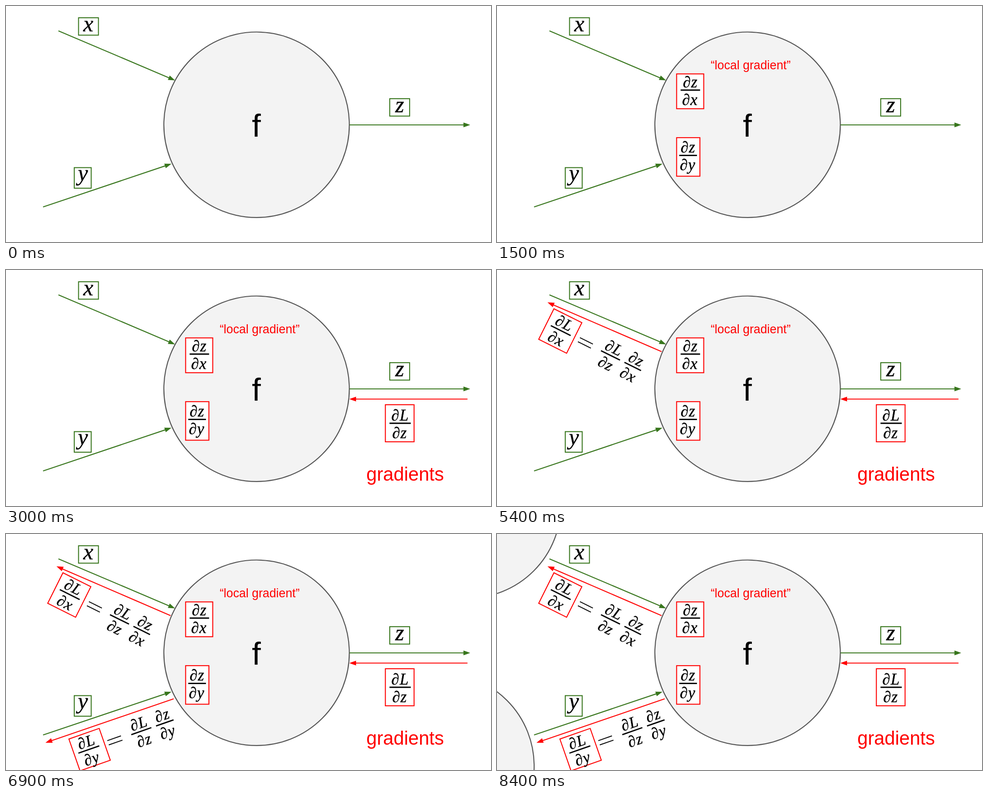
Animation of 1073x522 px, one loop 9000 ms. Source, as an HTML page:

```html
<!DOCTYPE html>
<html lang="en">
<head>
<meta charset="utf-8">
<title>Local gradients</title>
<style>
  html, body { margin: 0; width: 100%; height: 100%; overflow: hidden; background: #fff; }
  svg { display: block; width: 100%; height: 100%; }
  text { font-family: "Liberation Sans", Arial, sans-serif; }
  .math { font-family: "Liberation Serif", "Times New Roman", serif; font-style: italic;
          text-anchor: middle; letter-spacing: 1px; stroke: #000; stroke-width: .4; }
</style>
</head>
<body>
<svg id="stage" viewBox="0 0 1073 522" xmlns="http://www.w3.org/2000/svg"></svg>
<script>
const GREEN = '#38761d', RED = '#ff0000';
const STEP = 1500, STEPS = 6;
const stage = document.getElementById('stage');

function add(parent, tag, attrs, text) {
  const el = document.createElementNS('http://www.w3.org/2000/svg', tag);
  for (const key in attrs) el.setAttribute(key, attrs[key]);
  if (text) el.textContent = text;
  parent.appendChild(el);
  return el;
}

const group = (parent, attrs = {}) => add(parent, 'g', attrs);

function node(parent, cx, cy) {
  add(parent, 'circle', { cx, cy, r: 205.2, fill: '#f3f3f3', stroke: '#555', 'stroke-width': 2.2 });
}

function arrow(parent, x1, y1, x2, y2, color) {
  const length = Math.hypot(x2 - x1, y2 - y1);
  const angle = Math.atan2(y2 - y1, x2 - x1) * 180 / Math.PI;
  const g = group(parent, { transform: `translate(${x1} ${y1}) rotate(${angle})` });
  add(g, 'path', { d: `M0 0H${length - 13}`, stroke: color, 'stroke-width': 2.2 });
  add(g, 'path', { d: `M${length} 0l-15 -5.3v10.6z`, fill: color });
}

function box(parent, x, y, width, height, color) {
  add(parent, 'rect', { x, y, width, height, fill: '#fff', stroke: color, 'stroke-width': 2.1 });
}

function math(parent, x, y, size, text) {
  add(parent, 'text', { class: 'math', x, y, 'font-size': size }, text);
}

function label(parent, x, y, size, color, text) {
  add(parent, 'text', { x, y, 'font-size': size, fill: color }, text);
}

// The bar of the fraction is centred on (x, y).
function fraction(parent, x, y, width, top, bottom) {
  add(parent, 'path', { d: `M${x - width / 2} ${y}h${width}`, stroke: '#000', 'stroke-width': 2.8 });
  math(parent, x, y - 6.5, 35, '∂' + top);
  math(parent, x - 1, y + 32.5, 35, '∂' + bottom);
}

function chainRule(parent, x, y, angle, name, frame) {
  const g = group(parent, { transform: `translate(${x} ${y}) rotate(${angle})` });
  box(g, ...frame, RED);
  fraction(g, 0, 0, 49, 'L', name);
  add(g, 'path', { d: 'M45 -5h32M45 5h32', stroke: '#000', 'stroke-width': 2 });
  fraction(g, 123, 0, 47, 'L', 'z');
  fraction(g, 178, 0, 41, 'z', name);
}

const neighbours = group(stage);
node(neighbours, -64, -63.3);
node(neighbours, -123, 513.2);

const base = group(stage);
node(base, 554.4, 262.7);
add(base, 'text', { x: 553.8, y: 288.5, 'font-size': 71, 'text-anchor': 'middle' }, 'f');
arrow(base, 116, 55, 374, 164.5, GREEN);
arrow(base, 82, 444.5, 366, 349, GREEN);
arrow(base, 760, 263, 1027, 263, GREEN);
box(base, 160.5, 26, 44, 38.5, GREEN);
math(base, 182.5, 56, 50, 'x');
box(base, 151, 357.5, 37.5, 45.5, GREEN);
math(base, 170.5, 386, 50, 'y');
box(base, 849, 205, 44, 38.5, GREEN);
math(base, 871.5, 234.5, 50, 'z');

const local = group(stage);
label(local, 472.7, 140, 26.75, RED, '“local gradient”');
box(local, 397.4, 150.2, 60, 77, RED);
fraction(local, 427.8, 186, 43, 'z', 'x');
box(local, 397.4, 291.2, 51.5, 85.3, RED);
fraction(local, 422.8, 330.5, 39, 'z', 'y');

const incoming = group(stage);
arrow(incoming, 1021, 285.5, 759.5, 285.5, RED);
box(incoming, 839.3, 298, 63.5, 82, RED);
fraction(incoming, 872, 339, 47, 'L', 'z');
label(incoming, 797.3, 466, 41.7, RED, 'gradients');

const backX = group(stage);
arrow(backX, 364, 180.5, 111.7, 71.5, RED);
chainRule(backX, 141, 134, 26.5, 'x', [-35, -36.5, 69, 75.5]);

const backY = group(stage);
arrow(backY, 371, 364.5, 87.3, 461.7, RED);
chainRule(backY, 183.3, 476.7, -19.3, 'y', [-34, -36.5, 71, 74.5]);

// Each layer stays from its step to the end of the loop.
const layers = [base, local, incoming, backX, backY, neighbours];

function draw(time) {
  const step = Math.floor(time / STEP) % STEPS;
  layers.forEach((layer, i) => layer.setAttribute('display', i <= step ? 'inline' : 'none'));
}

const start = performance.now();
function tick() {
  draw(performance.now() - start);
  requestAnimationFrame(tick);
}
tick();
</script>
</body>
</html>
```
